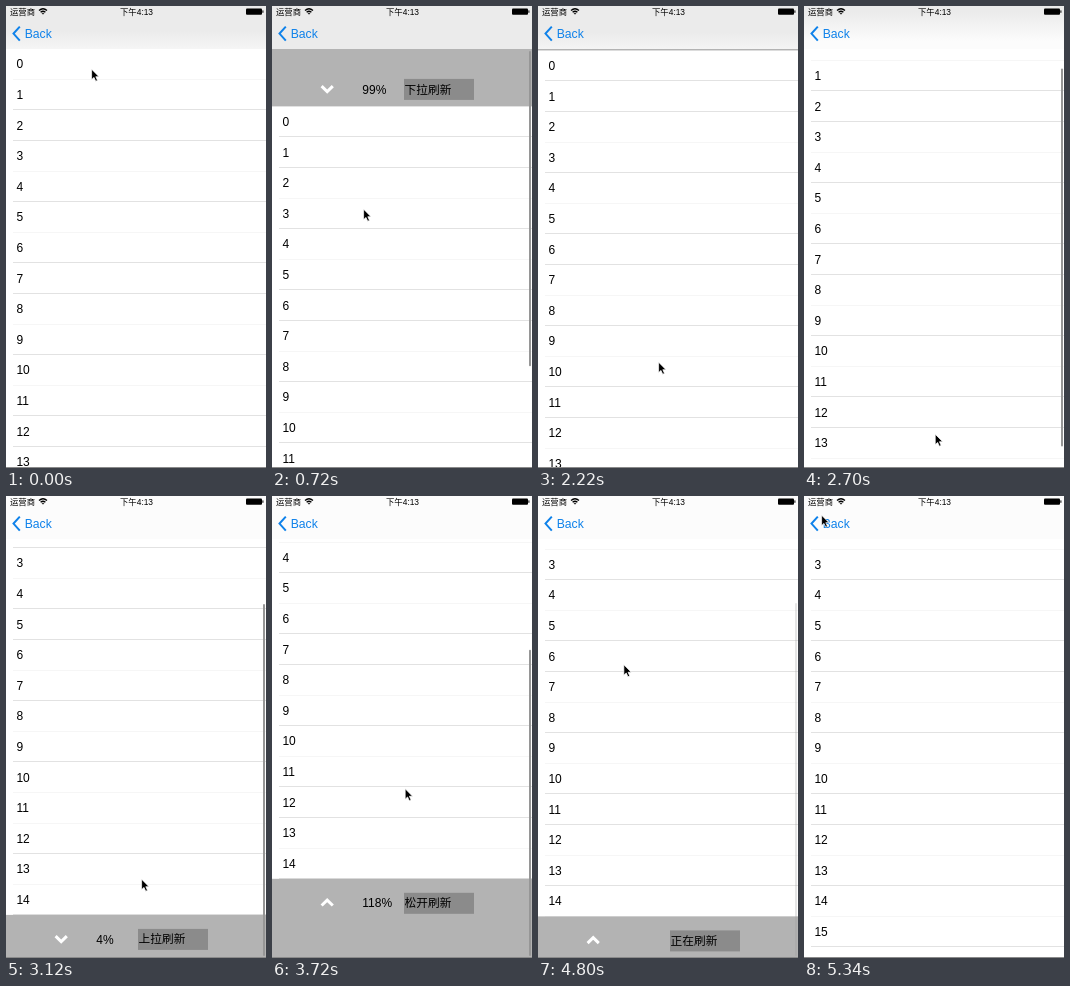
These frames come from a looping animation (260x462 px, 5.4 s). An HTML page:

```html
<!DOCTYPE html>
<html lang="zh-CN">
<head>
<meta charset="utf-8">
<style>
  html, body { margin: 0; width: 100%; height: 100%; overflow: hidden; background: #fff; }
  svg { display: block; width: 260px; height: 462px; }
  text { font: 12px "Liberation Sans", "Noto Sans CJK SC", "Noto Sans CJK", sans-serif; fill: #000; white-space: pre; }
  .zh { font-family: "Noto Sans CJK SC", "Noto Sans CJK", sans-serif; font-size: 11.7px; }
  .status { font-size: 8.4px; }
  .blue { fill: #0f82ea; font-size: 12.2px; }
  .arrow { fill: none; stroke: #fff; stroke-width: 3; }
</style>
</head>
<body>
<svg viewBox="0 0 260 462">
  <defs>
    <linearGradient id="fade" x1="0" y1="0" x2="0" y2="1">
      <stop offset=".8" stop-color="#ebebeb"/>
      <stop offset="1" stop-color="#ebebeb" stop-opacity="0"/>
    </linearGradient>
    <clipPath id="navClip"><rect width="260" height="43"/></clipPath>
  </defs>
  <rect width="260" height="462" fill="#fff"/>
  <g id="rows"></g>
  <g id="header"><rect y="-150" width="260" height="150" fill="#b3b3b3"/></g>
  <g id="footer"><rect width="260" height="200" fill="#b3b3b3"/></g>
  <rect id="bar" x="257" width="2" rx="1" fill="#969696"/>
  <rect y="461" width="260" height="1" fill="#8a8a8a"/>
  <g clip-path="url(#navClip)">
    <rect width="260" height="43" fill="#fcfcfc"/>
    <rect id="tint" y="-138" width="260" height="150" fill="url(#fade)"/>
  </g>
  <text class="zh status" x="4" y="8.8">运营商</text>
  <g fill="none" stroke="#000" stroke-width="1.3">
    <path d="M33 4.6Q37 .9 41 4.6M34.6 6.3Q37 4.1 39.4 6.3"/>
    <path d="M36 7.2h2L37 8.3z" fill="#000" stroke-width=".5"/>
  </g>
  <text class="status" x="130.5" y="8.8" text-anchor="middle">下午4:13</text>
  <rect x="240" y="2.5" width="16" height="6.2" rx="1"/>
  <rect x="256.4" y="4.4" width="1" height="2.4"/>
  <path d="M13.8 20.6L7.5 27.6L13.8 34.6" fill="none" stroke="#0f82ea" stroke-width="2"/>
  <text class="blue" x="18.7" y="32">Back</text>
  <path id="cursor" d="M-.4 -.8V9.6L2 7.4L3.7 11.2L5.5 10.4L3.8 6.7H7Z" stroke="#fff" stroke-width=".7"/>
</svg>
<script>
const LOOP = 5400, STEP = 60;
const TOP = 42.8, ROW = 30.6, COUNT = 15, HOLD = 42;
const LAST = 39.8; // scroll distance at which the last row meets the bottom edge
const RELEASE_TOP = 900, RESET_TOP = 2310, RELEASE_END = 4260, LOADED = 5220;

const $ = id => document.getElementById(id);
const lin = u => u;
const out = u => 1 - (1 - u) ** 3;
const soft = u => 1 - (1 - u) ** 1.5;
const inOut = u => u < .5 ? 4 * u ** 3 : 1 - 4 * (1 - u) ** 3;

// Each entry: time, values, easing into it
const scroll = [
  [0, [0]], [200, [0]], [720, [57.6], soft], [840, [62.9], soft], [RELEASE_TOP, [62.9]],
  [1290, [HOLD], out], [1890, [HOLD]], [RESET_TOP, [0], inOut],
  [2620, [0]], [3120, [-82.9], soft], [4020, [-127.6], soft],
  [RELEASE_END, [-127.6]], [4620, [-81.4], out], [LOOP, [-81.4]]
];
const pointer = [
  [0, [86, 64]], [200, [87, 83]], [720, [92, 204], soft], [960, [94, 219], soft],
  [1700, [94, 219]], [2220, [121, 357], inOut], [2600, [130, 446], soft],
  [3120, [136, 384], soft], [4020, [133, 272], soft], [4380, [133, 272]],
  [5280, [18, 20], inOut], [LOOP, [18, 20]]
];
const barAlpha = [
  [0, [0]], [200, [0]], [260, [1]], [1290, [1]], [1500, [0]],
  [2620, [0]], [2700, [1]], [4620, [1]], [4860, [0]], [LOOP, [0]]
];

function sample(track, t) {
  let i = 1;
  while (i < track.length - 1 && track[i][0] < t) i++;
  const [t0, a] = track[i - 1], [t1, b, ease = lin] = track[i];
  const u = ease(Math.min(1, (t - t0) / (t1 - t0)));
  return a.map((v, k) => v + (b[k] - v) * u);
}

function add(parent, tag, attrs, text = '') {
  const el = document.createElementNS('http://www.w3.org/2000/svg', tag);
  set(el, attrs);
  el.textContent = text;
  parent.append(el);
  return el;
}
function set(el, attrs) {
  for (const k in attrs) el.setAttribute(k, attrs[k]);
}
const show = (el, on) => el.setAttribute('visibility', on ? 'visible' : 'hidden');
const move = (el, x, y) => el.setAttribute('transform', `translate(${x} ${y})`);

const rows = Array.from({ length: 18 }, (_, i) => ({
  label: add($('rows'), 'text', { x: 10.4 }, String(i)),
  line: add($('rows'), 'rect', { x: 7, width: 253, height: 1 })
}));

function refresher(id, mid, pullText) {
  const group = $(id);
  add(group, 'rect', { x: 132, y: mid - 10, width: 70, height: 21, fill: '#8b8b8b' });
  const arrow = add(group, 'path', { class: 'arrow' });
  const percent = add(group, 'text', { x: 90.3, y: mid + 4.7 });
  const label = add(group, 'text', { class: 'zh', x: 132.6, y: mid + 4.6 });
  return (y, value, loading, showPercent) => {
    const up = loading || value >= 100, d = up ? -2.7 : 2.7;
    move(group, 0, y);
    arrow.setAttribute('d', `M49.6 ${mid - d}L55.2 ${mid + d}L60.8 ${mid - d}`);
    percent.textContent = Math.max(0, Math.floor(value)) + '%';
    show(percent, showPercent);
    label.textContent = loading ? '正在刷新' : up ? '松开刷新' : pullText;
  };
}
const setHeader = refresher('header', -17.5, '下拉刷新');
const setFooter = refresher('footer', 24, '上拉刷新');

function setBar(off, over, alpha) {
  let top = 45, bottom = 423 - Math.max(0, off) * 1.09;
  if (over >= 0) {
    top = 82 + .6 * Math.min(over, 43) + 1.27 * Math.max(0, over - 43);
    bottom = 460;
  } else if (off < 0) {
    top = 45 - off * .92;
    bottom = top + 378;
  }
  set($('bar'), { y: top, height: bottom - top, opacity: alpha });
}

function draw(t) {
  const [off] = sample(scroll, t);
  const over = -off - LAST;
  const loaded = t >= LOADED;
  const top = TOP + off;

  rows.forEach(({ label, line }, i) => {
    const y = top + ROW * (i + 1), edge = y - .1;
    label.setAttribute('y', y - 11);
    set(line, { y: Math.floor(edge), fill: edge % 1 > .4 ? '#e2e2e2' : '#f6f6f6' });
    show(label, loaded || i < COUNT);
    show(line, loaded || i < COUNT);
  });

  const busyTop = t > RELEASE_TOP && t < RESET_TOP;
  setHeader(top, (off - 42) * 6.36, busyTop, !busyTop);
  const busyEnd = t >= RELEASE_END && !loaded;
  setFooter(top + ROW * COUNT, (over - 41.8) * 3.18, busyEnd, t <= RELEASE_END);
  $('footer').style.display = loaded ? 'none' : '';

  move($('tint'), 0, top);
  setBar(off, over, sample(barAlpha, t)[0]);
  move($('cursor'), ...sample(pointer, t));
}

const start = performance.now();
function tick() {
  const t = (performance.now() - start) % LOOP;
  draw(t < 2 * STEP ? 0 : Math.floor(t / STEP) * STEP);
  requestAnimationFrame(tick);
}
tick();
</script>
</body>
</html>
```
